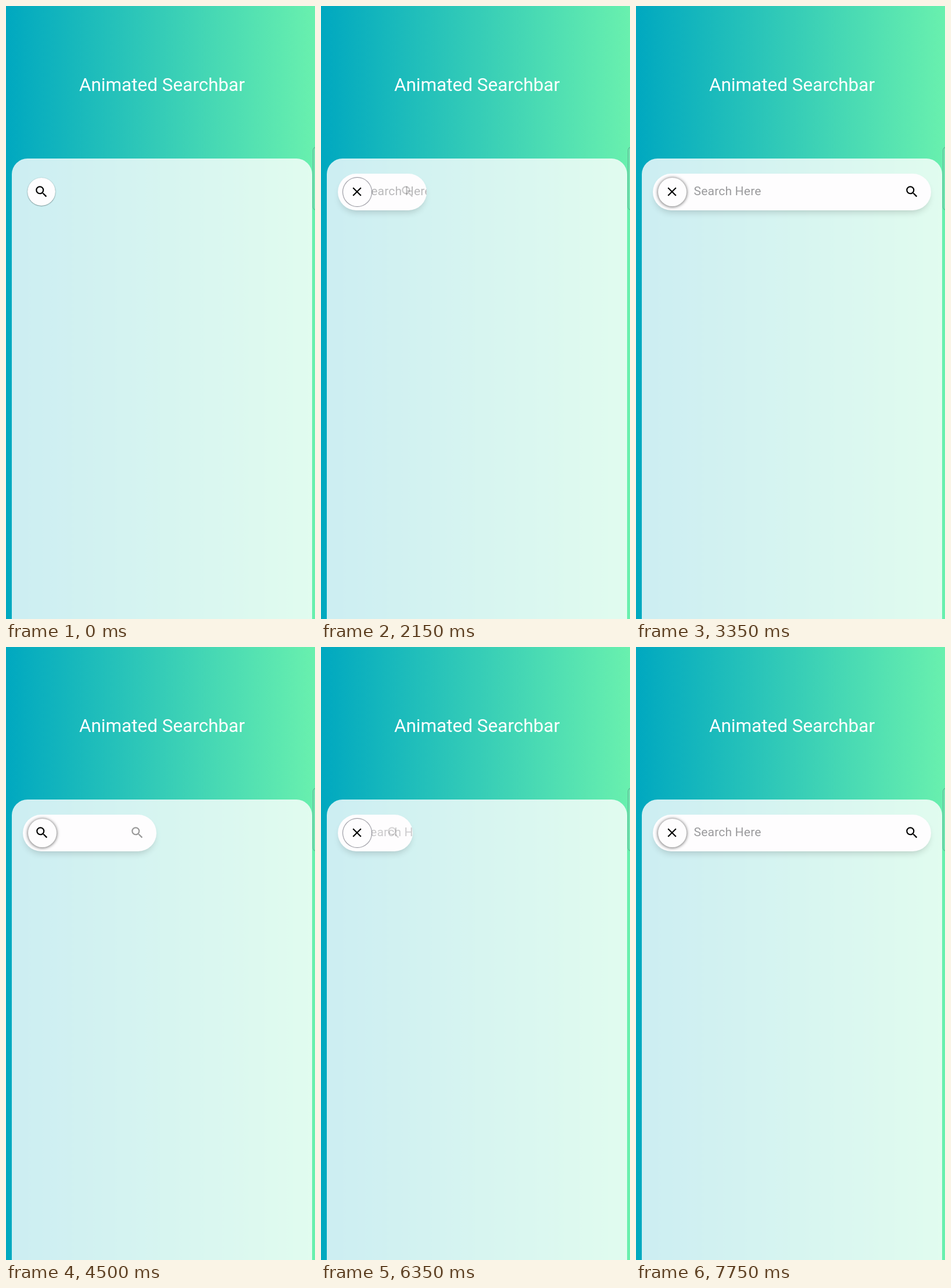
Animation, 532 px wide and 1053 px high, one loop 8000 ms. Source, as an HTML page:

```html
<!DOCTYPE html>
<html lang="en">
<head>
<meta charset="utf-8">
<title>Animated Searchbar</title>
<style>
  html, body { margin: 0; width: 100%; height: 100%; overflow: hidden; }
  body {
    position: relative;
    font-family: Roboto, sans-serif;
    background: linear-gradient(90deg, #00a8c0, #69f0ae);
  }
  body * { position: absolute; box-sizing: border-box; }

  .title {
    left: 0; top: 116px; width: 537px;
    font-size: 31.5px; line-height: 40px; text-align: center;
    color: #fff; white-space: nowrap;
  }
  .panel {
    left: 10px; top: 262px; width: 517px; height: 900px;
    border-radius: 27px;
    background: rgba(255, 255, 255, .8);
  }
  .handle {
    left: 528px; top: 242px; width: 14px; height: 109px;
    border: 1px solid rgba(70, 140, 120, .5); border-radius: 6px;
    background: rgba(120, 215, 175, .5);
  }

  .bar {
    left: 29px; top: 288px; height: 63px;
    border-radius: 32px; overflow: hidden;
    background: #fefdfe;
    box-shadow: 0 7px 13px -5px rgba(0, 0, 0, .2);
    animation: width 8s infinite, shown 8s step-end infinite;
  }
  .hint {
    left: 70.5px; top: 15px;
    font-size: 21px; line-height: 30px; letter-spacing: .2px;
    color: #9a9a9c; white-space: nowrap;
    animation: slide 8s linear infinite, hint 8s linear infinite;
  }
  svg { width: 26px; height: 26px; fill: #000; }
  .bar svg { right: 20px; top: 18px; animation: reveal 8s infinite; }

  .button {
    border-radius: 50%;
    background: #fefdfe;
    animation: place 8s step-end infinite, lift 8s linear infinite;
  }
  .button svg { left: calc(50% - 13px); top: calc(50% - 13px); }
  .close { animation: cross 8s step-end infinite; }
  .find { animation: lens 8s step-end infinite; }

  /* Opens 25.669-34.606%, closes 49.712-58.65%, opens again 78.508-87.445% */
  @keyframes width {
    0%, 25.669% { width: 63px; animation-timing-function: ease-out; }
    34.606%, 49.712% { width: 479px; animation-timing-function: ease-in; }
    58.65%, 78.508% { width: 63px; animation-timing-function: ease-out; }
    87.445%, 100% { width: 479px; }
  }
  @keyframes reveal {
    0%, 25.669% { opacity: 0; animation-timing-function: ease-out; }
    34.606%, 49.712% { opacity: 1; animation-timing-function: ease-in; }
    58.65%, 78.508% { opacity: 0; animation-timing-function: ease-out; }
    87.445%, 100% { opacity: 1; }
  }
  @keyframes slide {
    0%, 25.669%, 58.65%, 78.508% { transform: translateX(-30px); }
    34.606%, 49.712%, 87.445%, 100% { transform: none; }
  }
  @keyframes hint {
    0%, 25.669%, 52.2%, 78.508% { opacity: 0; }
    27.42%, 49.712%, 80.26%, 100% { opacity: 1; }
  }
  @keyframes shown {
    0%, 58.65% { visibility: hidden; }
    25.669%, 78.508%, 100% { visibility: visible; }
  }
  @keyframes cross {
    0%, 49.712% { opacity: 0; }
    25.669%, 78.508%, 100% { opacity: 1; }
  }
  @keyframes lens {
    0%, 49.712% { opacity: 1; }
    25.669%, 78.508%, 100% { opacity: 0; }
  }
  @keyframes place {
    0%, 58.65% { left: 37px; top: 295px; width: 48px; height: 48px; }
    25.669%, 78.508%, 100% { left: 37.5px; top: 294.5px; width: 49px; height: 49px; }
  }
  @keyframes lift {
    0%, 25.669%, 61.2%, 78.508% { box-shadow: 0 .5px 1.5px 0 rgba(20, 50, 50, .75); }
    26.2%, 27.4%, 79%, 80.2% { box-shadow: 0 0 1px 1px rgba(60, 60, 75, .6); }
    29.4%, 58.65%, 82.2%, 100% { box-shadow: 0 .5px 5px 1px rgba(0, 0, 0, .5); }
  }
</style>
</head>
<body>
  <svg style="display:none">
    <symbol id="lens" viewBox="0 0 24 24">
      <path d="M15.5 14h-.79l-.28-.27A6.47 6.47 0 0 0 16 9.500 6.500 6.500 0 1 0 9.500 16c1.610 0 3.090-.59 4.230-1.570l.27.28v.79l5 4.990L20.490 19zm-6 0a4.500 4.500 0 1 1 0-9 4.500 4.500 0 0 1 0 9z"/>
    </symbol>
    <symbol id="cross" viewBox="0 0 24 24">
      <path d="M19 6.410 17.590 5 12 10.590 6.410 5 5 6.410 10.590 12 5 17.590 6.410 19 12 13.410 17.590 19 19 17.590 13.410 12z"/>
    </symbol>
  </svg>

  <div class="title">Animated Searchbar</div>
  <div class="panel"></div>
  <div class="handle"></div>

  <div class="bar">
    <div class="hint">Search Here</div>
    <svg><use href="#lens"/></svg>
  </div>
  <div class="button">
    <svg class="find"><use href="#lens"/></svg>
    <svg class="close"><use href="#cross"/></svg>
  </div>
</body>
</html>
```
